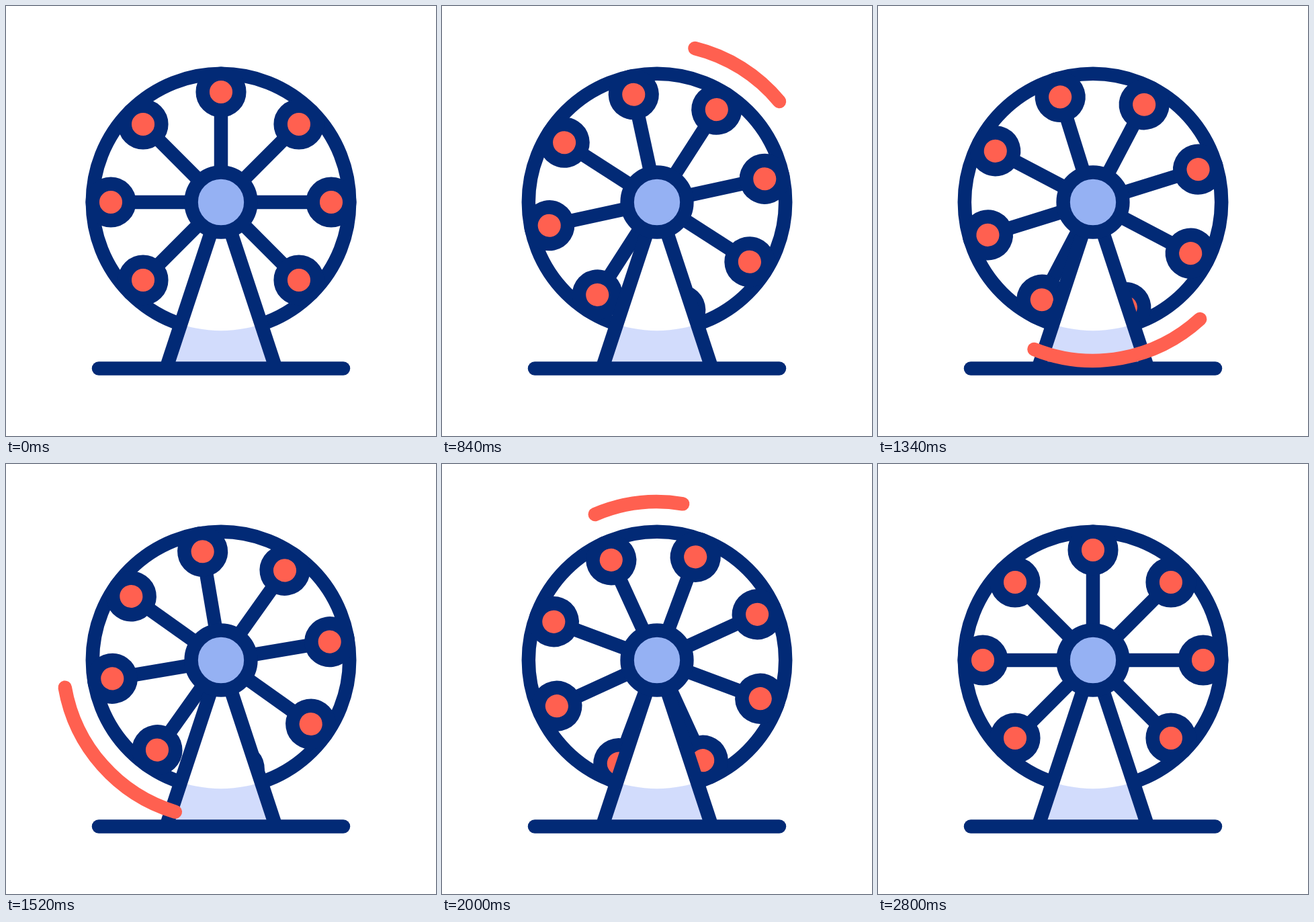
Animation, 640 px wide and 640 px high, one loop 3600 ms. Source, as an HTML page with a canvas:

```html
<!DOCTYPE html>
<html lang="en">
<head>
<meta charset="utf-8">
<title>Ferris wheel</title>
<style>
  html, body { margin: 0; width: 100%; height: 100%; overflow: hidden; background: #fff; }
  canvas { display: block; width: 640px; height: 640px; }
</style>
</head>
<body>
<canvas id="stage" width="640" height="640"></canvas>
<script>
const ctx = document.getElementById('stage').getContext('2d');
const LOOP = 3600, CX = 320, CY = 292, LINE = 20.5;
const NAVY = '#022a76', RED = '#ff6050', BLUE = '#95b1f3', PALE = '#d2dcfc';
const TAU = Math.PI * 2, RAD = Math.PI / 180;
const BASE = 539.5, LEG = 0.33 * (BASE - CY);
const SWING = 16, SWEEP = 378;

// Eased move from a to b between times t0 and t1
function ease(t, t0, t1, a, b) {
  const p = Math.min(1, Math.max(0, (t - t0) / (t1 - t0)));
  return a + (b - a) * p * p * (3 - 2 * p);
}

// Pull back, spin once past the end, settle
function wheelAngle(t) {
  if (t < 400) return ease(t, 0, 400, 0, -SWING);
  if (t < 2400) return ease(t, 400, 2400, -SWING, 360 + SWING);
  return ease(t, 2400, 2800, 360 + SWING, 360);
}

function line(x1, y1, x2, y2) {
  ctx.beginPath();
  ctx.moveTo(x1, y1);
  ctx.lineTo(x2, y2);
  ctx.stroke();
}

function ring(x, y, r, fill) {
  ctx.beginPath();
  ctx.arc(x, y, r, 0, TAU);
  ctx.fillStyle = fill;
  ctx.fill();
  ctx.stroke();
}

function drawWheel(angle) {
  ring(CX, CY, 191.2, '#fff');
  ctx.save();
  ctx.translate(CX, CY);
  ctx.rotate(angle * RAD);
  for (let i = 0; i < 8; i++) {
    line(0, -44, 0, -137);
    ring(0, -164, 27.3, RED);
    ctx.rotate(TAU / 8);
  }
  ctx.restore();
}

function drawStand() {
  ctx.save();
  ctx.beginPath();
  ctx.moveTo(CX, CY);
  ctx.lineTo(CX - LEG, BASE);
  ctx.lineTo(CX + LEG, BASE);
  ctx.closePath();
  ctx.fillStyle = PALE;
  ctx.fill();
  ctx.clip();
  ctx.beginPath();
  ctx.arc(CX, CY, 191.2, 0, TAU);
  ctx.fillStyle = '#fff';
  ctx.fill();
  ctx.restore();

  line(CX, CY, CX - LEG, BASE);
  line(CX, CY, CX + LEG, BASE);
  ctx.lineCap = 'round';
  line(138, BASE, 502, BASE);
  ctx.lineCap = 'butt';
  ring(CX, CY, 44.4, BLUE);
}

function drawTrail(t) {
  const head = ease(t, 450, 2155, 0, SWEEP);
  const tail = ease(t, 645, 2350, 0, SWEEP);
  if (head - tail < 0.01) return;
  ctx.beginPath();
  ctx.arc(CX, CY, 235.8, (tail - 90) * RAD, (head - 90) * RAD);
  ctx.strokeStyle = RED;
  ctx.lineCap = 'round';
  ctx.stroke();
}

function draw(t) {
  ctx.fillStyle = '#fff';
  ctx.fillRect(0, 0, 640, 640);
  ctx.lineWidth = LINE;
  ctx.lineCap = 'butt';
  ctx.strokeStyle = NAVY;
  drawWheel(wheelAngle(t));
  drawStand();
  drawTrail(t);
}

const start = performance.now();
function tick() {
  draw((performance.now() - start) % LOOP);
  requestAnimationFrame(tick);
}
tick();
</script>
</body>
</html>
```
